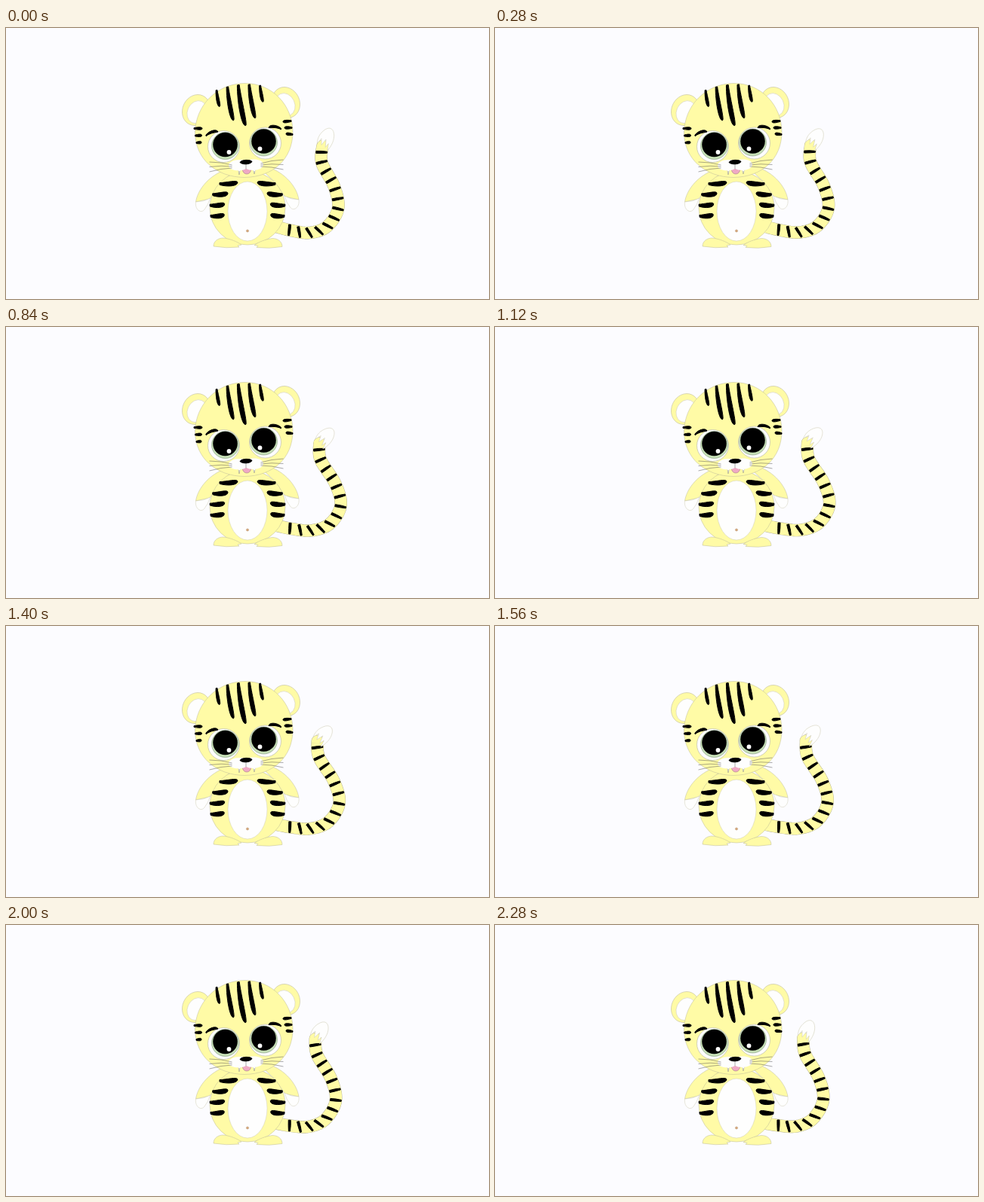
An HTML page that plays this animation: 640x360 px, repeating every 2320 ms.

```html
<!DOCTYPE html>
<html lang="en">
<head>
<meta charset="utf-8">
<title>Tiger cub</title>
<style>
html, body { margin: 0; width: 100%; height: 100%; overflow: hidden; background: #fcfcff; }
svg { display: block; width: 100vw; height: 100vh; }
.fur { fill: #fffba6; stroke: #bdba98; stroke-width: .5; }
.white { fill: #fefefe; stroke: #cfccb4; stroke-width: .5; }
.ink { fill: #000; stroke: #000; stroke-width: 1; stroke-linejoin: round; }
.line { fill: none; stroke: #555; stroke-width: .5; }
.tube { fill: none; stroke-linecap: round; stroke-linejoin: round; }
</style>
</head>
<body>
<svg viewBox="0 0 640 360">
  <path id="edge" class="tube" stroke="#b0ad90" stroke-width="16.600"/>
  <path id="tail" class="tube" stroke="#fffba6" stroke-width="15.800"/>
  <path id="bands" class="ink"/>
  <path id="tuft" class="white" d="M-8 -1L-5 -9L-2 -1L1 -10L4 0L6 -6L8 3C11 -4 12 -14 8 -21C4 -28 -2 -27 -6 -20C-10 -13 -10 -7 -8 -1Z"/>

  <g id="arm">
    <path class="fur" d="M292 188C270 195 254 214 251.500 231L270 227 283 208 302 190Z"/>
    <path class="white" d="M251.500 231C250 242 259 247 263 241Q268 235 270.500 226Q262 231 251.500 231Z"/>
  </g>
  <use href="#arm" transform="translate(639.500 -3) scale(-1 1)"/>

  <ellipse class="fur" cx="320" cy="239" rx="50" ry="49"/>
  <ellipse class="white" cx="320" cy="243.500" rx="26" ry="39.500"/>
  <circle cx="320" cy="269.500" r="1.600" fill="#d9a878" stroke="#a98a68" stroke-width=".4"/>
  <path id="foot" class="fur" d="M275 290C275 283 281 279 288 279C297 280 307 284 312 288L307 289 309 291Q292 293 275 290Z"/>
  <use href="#foot" transform="translate(641 .500) scale(-1 1)"/>

  <g id="ear" transform="rotate(25 252 109)">
    <ellipse class="fur" cx="252" cy="109" rx="18" ry="21"/>
    <ellipse class="white" cx="254" cy="111" rx="12.500" ry="15.500"/>
  </g>
  <use href="#ear" transform="translate(623 -10) scale(-1 1)"/>
  <path class="fur" d="M316 73.500C353 73 380 103 380 138C380 174 354 198 316 198.500C278 198 251 174 250.500 139C251 103 279 74 316 73.500Z"/>
  <g id="eyes"></g>

  <!-- muzzle -->
  <path fill="#efa9c4" stroke="#96707f" stroke-width=".5" d="M313 187Q314 194 319 194Q324 194 325 187Z"/>
  <path class="white" d="M307.500 188L309 194.500 311 188ZM327 188L329 193.500 331 188Z"/>
  <path fill="#fefefe" d="M318 176C306 173 295 177 295 183C296 190 312 191 318 187C326 191 341 189 341 181C340 174 328 173 318 176Z"/>
  <path class="line" d="M318 180V187M309 190V195M329 190V194"/>
  <path class="ink" d="M310 178.500C312 174.500 324 174.500 326 177.500C324 181.500 313 182 310 178.500Z"/>
  <path id="whiskers" class="line"/>
  <path id="marks" class="ink"/>
</svg>

<script>
const $ = id => document.getElementById(id);
const { PI, sin, cos, max, sqrt, hypot } = Math;
const LOOP = 2320, STEP = 40, SPAN = LOOP - STEP;
const range = n => [...Array(n).keys()];
const setPath = (id, d) => $(id).setAttribute("d", d);

// Stripe from a blunt narrow end to a swollen round end; bend bows it sideways.
function leaf(ax, ay, bx, by, w, bend = 0) {
  const dx = bx - ax, dy = by - ay, len = hypot(dx, dy);
  const at = (k, off) =>
    `${(ax + dx * k - dy / len * off).toFixed(2)} ${(ay + dy * k + dx / len * off).toFixed(2)}`;
  return `M${at(0, w * .25)}C${at(.4, bend + w * .55)} ${at(1, bend * .5 + w * .8)} ${at(1, 0)}` +
         `C${at(1, bend * .5 - w * .8)} ${at(.4, bend - w * .55)} ${at(0, -w * .25)}Z`;
}

const forehead = range(5).map(i => {
  const arch = sin(PI * i / 4), x = 279 + 14.4 * i, y = 75 + (x - 320) ** 2 / 225;
  const len = 22 + 32 * arch;
  return leaf(x, y, x + len * .18, y + len, 3.5 + 2 * arch, 1 + 1.5 * arch);
});
const cheeks = range(3).map(i =>
  leaf(249 + 1.5 * i, 133.5 + 9.5 * i, 260 - .5 * i, 133.5 + 9.2 * i, 3.2) +
  leaf(378 + i, 123.5 + 9 * i, 367 + 2 * i, 124.5 + 8 * i, 3.2));
const brows = [leaf(265, 143, 281, 138, 3, -4), leaf(364.5, 134, 348, 132.5, 3, 4)];

// Each flank stripe runs from the side of the body towards the belly.
const halfWidth = (y, cy, rx, ry) => rx * sqrt(1 - ((y - cy) / ry) ** 2);
const flanks = range(4).map(i => {
  const y = 206 + 14.3 * i;
  const outer = halfWidth(y, 239, 50, 49), inner = halfWidth(y, 243.5, 26, 39.5) + 5;
  return [-1, 1].map(s => leaf(320 + s * outer, y + 1, 320 + s * inner, y - 1, 5.5, -s * 2)).join("");
});
setPath("marks", [...forehead, ...cheeks, ...brows, ...flanks].join(""));

setPath("whiskers", range(3).map(i => [-1, 1].map(s => {
  const y = 181 + 2 * i - s, end = 176.5 + 6.5 * i - s * 1.5;
  return `M${318.5 + s * 19} ${y}Q${318.5 + s * 33} ${(y + end) / 2 - 2} ${318.5 + s * 49} ${end}`;
}).join("")).join(""));

const disc = (x, y, r, fill, line = "none") =>
  `<circle cx="${x}" cy="${y}" r="${r}" fill="${fill}" stroke="${line}" stroke-width=".6"/>`;
const eye = (x, y, s) =>
  disc(x - 2 * s, y + 2.5, 21, "#fefefe", "#b4b4a8") + disc(x, y + 1.5, 18, "#c6dfb6", "#8aa088") +
  disc(x, y, 16.3, "#000") + disc(x + 5 * s, y + 10, 2.9, "#fff");
$("eyes").innerHTML = eye(290.5, 155, 1) + eye(341.5, 150.5, -1);

// Resting tail spine, hip to tuft.
const spine = [[355, 263], [378, 269], [402, 272], [425, 264], [440, 240], [435, 211], [418.5, 179], [419.5, 157]];

// The curve swings out and back while the whole tail lifts and its end drifts left.
function poseAt(p) {
  const swing = 4.5 * sin(1.25 * PI * p);
  return spine.map(([x, y], i) => {
    const w = i / (spine.length - 1);
    return [x + swing * sin(PI * w) ** 2 - 11 * p * w ** 3, y - 8 * p * sin(.7 * PI * w)];
  });
}

// Catmull-Rom samples through the spine.
function smooth(p) {
  const out = [], n = 12;
  for (let i = 0; i < p.length - 1; i++) {
    const a = p[i - 1] || p[i], b = p[i], c = p[i + 1], d = p[i + 2] || c;
    for (let s = 0; s < n; s++) {
      const u = s / n;
      out.push([0, 1].map(q => .5 * (2 * b[q] + (c[q] - a[q]) * u +
        (2 * a[q] - 5 * b[q] + 4 * c[q] - d[q]) * u * u +
        (3 * b[q] - a[q] - 3 * c[q] + d[q]) * u ** 3)));
    }
  }
  return out.concat([p[p.length - 1]]);
}

function band(x, y, ux, uy, slant) {
  const c = cos(slant), s = sin(slant);
  const vx = ux * c - uy * s, vy = ux * s + uy * c;
  const at = (along, across) =>
    `${(x + vx * along - vy * across).toFixed(2)} ${(y + vy * along + vx * across).toFixed(2)}`;
  return `M${at(-1, -7.3)}Q${at(-2, 0)} ${at(-1.5, 7.3)}L${at(1.5, 7.3)}Q${at(1.6, 0)} ${at(1, -7.3)}Z`;
}

function draw(t) {
  const p = t / SPAN, pts = poseAt(p), end = pts[pts.length - 1];
  const line = smooth(pts).reverse();
  const d = "M" + line.map(q => q.map(v => v.toFixed(2)).join(" ")).join("L");
  setPath("edge", d);
  setPath("tail", d);

  const sum = [0];
  for (let i = 1; i < line.length; i++)
    sum.push(sum[i - 1] + hypot(line[i][0] - line[i - 1][0], line[i][1] - line[i - 1][1]));
  const total = sum[sum.length - 1];
  setPath("bands", range(13).map(n => {
    const f = .043 + .0705 * n, i = sum.findIndex(s => s >= f * total);
    const a = line[i - 1], b = line[i], len = sum[i] - sum[i - 1], k = (f * total - sum[i - 1]) / len;
    const slant = -.5 * max(0, sin(PI * (f - .5) / .42));
    return band(a[0] + (b[0] - a[0]) * k, a[1] + (b[1] - a[1]) * k,
      (b[0] - a[0]) / len, (b[1] - a[1]) / len, slant);
  }).join(""));

  const turn = Math.atan2(10 + 12 * sin(PI * p), 26) * 180 / PI;
  $("tuft").setAttribute("transform", `translate(${end[0]} ${end[1]}) rotate(${turn})`);
}

const start = performance.now();
function tick() {
  const t = (performance.now() - start) % LOOP;
  draw(Math.floor(t / STEP) * STEP);
  requestAnimationFrame(tick);
}
draw(0);
requestAnimationFrame(tick);
</script>
</body>
</html>
```
